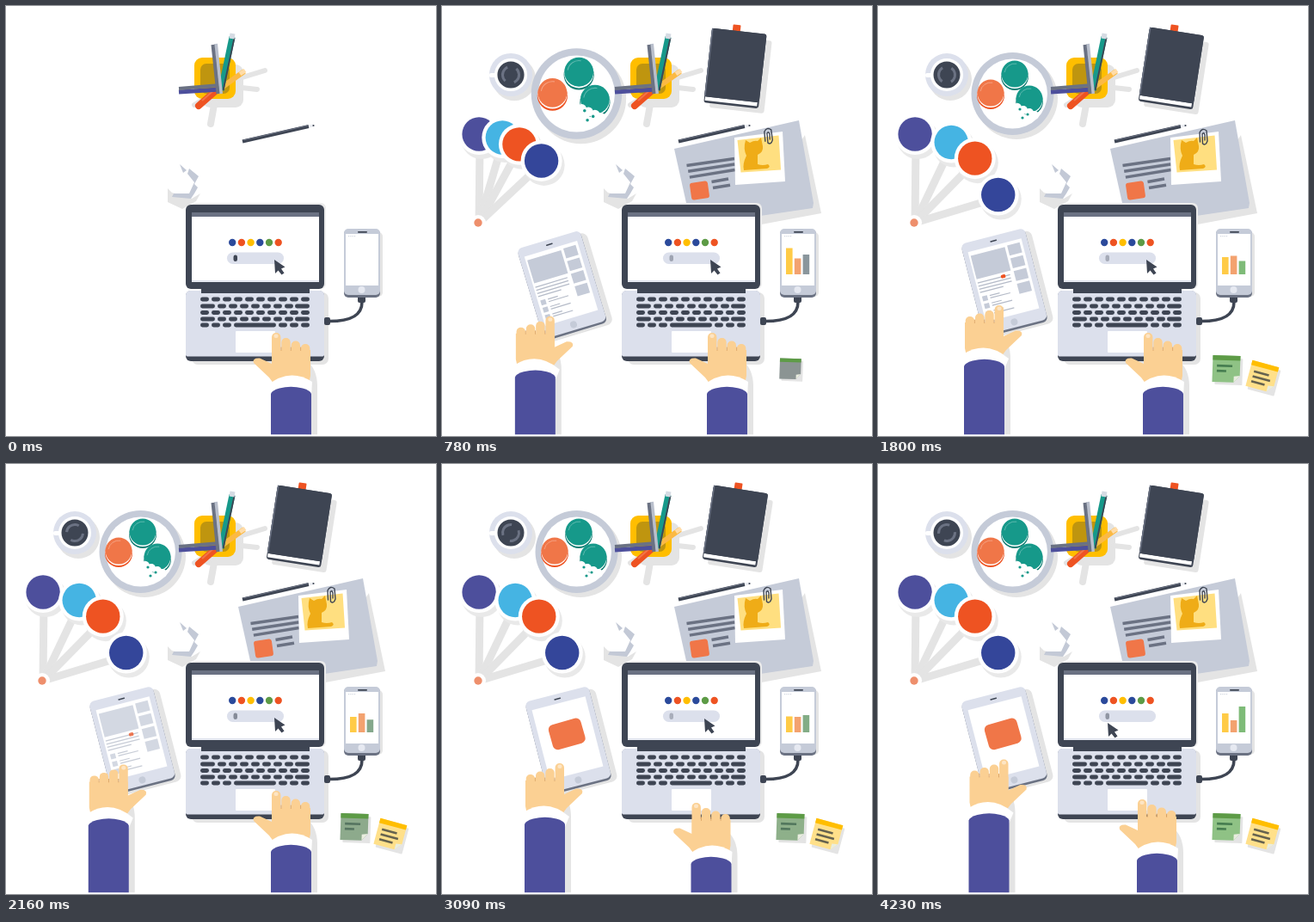
Recreate the animation shown at these times as an HTML page with a canvas. Size 500 by 500 pixels, loop 4.26 s.

```html
<!DOCTYPE html>
<html lang="en">
<head>
<meta charset="utf-8">
<title>Busy desk</title>
<style>
html, body { margin: 0; width: 100%; height: 100%; overflow: hidden; background: #fff; }
canvas { display: block; width: 100vw; height: 100vh; }
</style>
</head>
<body>
<canvas id="stage"></canvas>
<script>
const LOOP = 4260, STEP = 30;
const DARK = '#3e4553', SLATE = '#6b7283', MID = '#c5cbd8', PALE = '#dce0ec', SHADE = '#e4e4e4';
const WHITE = '#fff', YELLOW = '#ffbe00', RED = '#ee5322', CORAL = '#f07648', TEAL = '#16998a';
const PURPLE = '#4d4f9c', NAVY = '#34469a', SKY = '#45b4e3', GREEN = '#5d9b46', SKIN = '#fbd093';

const canvas = document.getElementById('stage');
const c = canvas.getContext('2d');

// Easing and keyframes
const clamp = v => Math.max(0, Math.min(1, v));
const mix = (a, b, p) => a + (b - a) * p;
const span = (t, start, length) => clamp((t - start) / length);
const outBack = p => p <= 0 ? 0 : 1 + 2.7 * (p - 1) ** 3 + 1.7 * (p - 1) ** 2;
const outCubic = p => 1 - (1 - p) ** 3;
const smooth = p => p * p * (3 - 2 * p);

// Keys are rows of [time, value, value, ...]
function track(t, keys) {
  let i = 0;
  while (i < keys.length - 2 && t > keys[i + 1][0]) i++;
  const a = keys[i], b = keys[i + 1];
  const p = smooth(span(t, a[0], b[0] - a[0]));
  return a.slice(1).map((v, k) => mix(v, b[k + 1], p));
}

// Drawing helpers
function fill(color) { c.fillStyle = color; c.fill(); }
function rect(x, y, w, h, color, r = 0) {
  c.beginPath();
  c.roundRect(x, y, w, h, r);
  fill(color);
}
function disc(x, y, r, color) {
  c.beginPath();
  c.arc(x, y, r, 0, 7);
  fill(color);
}
function poly(color, ...p) {
  c.beginPath();
  for (let i = 0; i < p.length; i += 2) c.lineTo(p[i], p[i + 1]);
  c.closePath();
  fill(color);
}
function line(x1, y1, x2, y2, w, color, cap = 'butt') {
  c.beginPath();
  c.moveTo(x1, y1);
  c.lineTo(x2, y2);
  c.lineWidth = w;
  c.lineCap = cap;
  c.strokeStyle = color;
  c.stroke();
}
function shape(d, color) { c.fillStyle = color; c.fill(new Path2D(d)); }
function trace(d, w, color) {
  c.lineWidth = w;
  c.lineCap = 'round';
  c.strokeStyle = color;
  c.stroke(new Path2D(d));
}
function at(x, y, deg, scale, draw) {
  if (scale <= 0) return;
  c.save();
  c.translate(x, y);
  c.rotate(deg * Math.PI / 180);
  c.scale(scale, scale);
  draw();
  c.restore();
}
function pop(x, y, scale, draw) {
  at(x, y, 0, scale, () => { c.translate(-x, -y); draw(); });
}

// Green items drift between grey and green
function greenTint(t, grey, green) {
  const [p] = track(t, [[0, 0], [780, .1], [1290, 0], [1800, 1], [2550, 0], [3090, .65], [4230, 1]]);
  return `rgb(${grey.map((v, i) => Math.round(mix(v, green[i], p)))})`;
}

function cup() {
  rect(228, 68, 48, 50, SHADE, 9);
  line(265, 86, 301, 75, 6, SHADE, 'round');
  line(274, 95, 292, 97, 6, SHADE, 'round');
  line(242, 115, 238, 137, 8, SHADE, 'round');
  line(234, 106, 219, 115, 6, SHADE, 'round');
  rect(219, 60, 48, 48, YELLOW, 9);
  rect(226, 67, 34, 35, '#bf950f', 7);
  line(249, 96, 277, 76, 6, '#fbb944');
  line(272, 79, 278, 75, 5, '#ffdca8');
  line(248, 95, 224, 116, 8, RED, 'round');
  line(246, 94, 228, 110, 2, CORAL);
  line(249, 97, 201, 100, 5, PURPLE);
  line(249, 92, 201, 96, 4, SLATE);
  line(250, 98, 263, 36, 7, TEAL);
  line(252.5, 98, 265.5, 37, 1.8, DARK);
  line(262.5, 38, 263.5, 32, 6, '#d5dbe3');
  line(250, 102, 244, 44, 4, '#b9bfcc');
  line(246.5, 102, 240.5, 45, 4, SLATE);
}

function pencil() {
  line(275, 157.5, 352, 140, 4, DARK);
  line(276, 156, 351, 139, 1, SLATE);
  line(352, 140, 357, 139, 3, '#eceef3');
  disc(357.5, 139, 1.1, DARK);
}

function crumple() {
  poly(SHADE, 188, 212, 193, 217, 216, 224, 226, 218, 221, 227, 205, 236, 188, 228);
  poly('#c3c9d6', 213, 189, 224, 198, 219, 207, 223, 211, 219, 218, 215, 224,
    193, 222, 195, 218, 213, 218, 219, 205, 211, 195);
  poly('#c3c9d6', 202, 184, 210, 191, 206, 194);
}

function cursor(x, y) {
  poly(DARK, x, y, x + 1, y + 16, x + 4.5, y + 12.5, x + 8.5, y + 17.5, x + 11.5, y + 15.5, x + 8, y + 10.5, x + 12.5, y + 8.5);
}

function laptop(t) {
  rect(215, 229, 157, 100, '#ebebeb', 6);
  rect(216, 333, 159, 84, SHADE, 7);
  rect(209, 231, 161, 98, DARK, 6);
  rect(216, 240, 148, 81, WHITE);
  rect(216, 240, 148, 5, SLATE);
  rect(216, 319, 148, 1.5, PALE);
  rect(209, 331, 161, 82, DARK, 6);
  rect(209, 331, 161, 76.5, PALE, [5, 5, 2, 2]);
  rect(227, 328, 126, 6, DARK);

  const key = (x, y, w = 10) => rect(x, y - 2.5, w, 5, DARK, 2.4);
  [341, 349, 356.5, 364, 371].forEach((y, row) => {
    const wide = row % 2;
    if (wide) { key(226, y, 17); key(336, y, 17); }
    for (let i = 0; i < (wide ? 7 : 10); i++) {
      if (row === 4 && i > 2 && i < 7) continue;
      key((wide ? 246 : 226) + i * 13, y);
    }
  });
  key(265, 371, 49);
  rect(267, 378, 46, 25, WHITE, 1);

  ['#2b4a9b', RED, YELLOW, '#2b4a9b', GREEN, RED].forEach((color, i) => disc(263.2 + i * 10.7, 275, 4.2, color));
  rect(257, 286.5, 66, 13.5, PALE, 6.7);
  c.globalAlpha = .65 + .35 * Math.cos(t * 2 * Math.PI / 1270);
  rect(264.5, 289.5, 4.5, 7.5, DARK, 2.2);
  c.globalAlpha = 1;
  cursor(...track(t, [[0, 312, 295], [2750, 312, 295], [3090, 305, 296], [3700, 267, 301], [LOOP, 267, 301]]));
}

function phone(t) {
  trace('M414 344C414 360 401 366.500 376 366.500', 3.6, DARK);
  rect(370, 362, 7, 9, DARK, 2);
  rect(409, 336, 9, 9, DARK, 2);
  rect(398, 263, 40, 75, SHADE, 5);
  rect(393, 260, 42, 79, SLATE, 5);
  rect(393, 259, 42, 77, MID, 5);
  rect(395, 265, 38, 60, WHITE);
  rect(409, 262, 11, 1.7, DARK, 1);
  disc(413.5, 330, 4, '#e6e9f1');
  for (let i = 0; i < 4; i++) rect(398 + i * 2.3, 267.3, 1.2, 1, MID);
  const bars = track(t, [[0, 0, 0, 0], [330, 0, 0, 0], [780, 30.5, 18.5, 23], [1290, 26.5, 19, 20], [1800, 20, 21.5, 15.500],
    [2550, 16, 22.5, 14], [3090, 18.5, 18, 20], [4230, 22, 14, 30]]);
  const tints = ['#ffcb47', '#f3a26f', greenTint(t, [139, 146, 160], [126, 187, 120])];
  bars.forEach((h, i) => rect(400 + i * 9.8, 312 - h, 7.6, h, tints[i]));
}

function paper(t) {
  pop(350, 195, outBack(span(t, 60, 600)), () => {
    poly(SHADE, 422, 150, 441, 241, 366, 255, 366, 236);
    poly(MID, 270, 166, 415, 133, 432, 229, 431, 235, 370, 244, 286, 238);
    for (let i = 0; i < 3; i++)
      line(284.5 + i * 1.7, 185.5 + i * 6.8, 340 + i * .4, 177.5 + i * 6.5, 3.4, SLATE);
    at(299.5, 214.5, -8, 1, () => rect(-10.5, -10, 21, 20, CORAL, 3));
    line(313.5, 204.5, 333, 201, 3.4, SLATE);
    line(315, 211.5, 335, 208.3, 3.4, SLATE);
  });
  pop(369, 178, outBack(span(t, 330, 400)), () => {
    poly(WHITE, 340, 153, 396, 146, 399, 204, 341, 208);
    poly('#ffdf80', 343.5, 156, 391.5, 150.5, 394, 190.5, 347.5, 193.5);
    shape('M353 156L358 159Q363 156 367 157L371 153L373 163Q374 170 367 173L367 184Q373 186 379 184Q383 187 378 189L351 191Q349 184 354 174Q350 166 353 156Z', '#efac17');
  });
  const clip = outCubic(span(t, 570, 380));
  if (clip > 0) at(378 + (1 - clip) * 12, 152 - (1 - clip) * 10, (1 - clip) * -30, 1, () =>
    trace('M-3.500 6L-4-5Q-1-11 4-7L5 5Q3 11-.500 8L-1-3Q1-6 2-2L2 4', 1.4, DARK));
}

function book(t) {
  const [deg] = track(t, [[0, -16], [120, -16], [780, 6.4], [1150, 9.2], [1500, 8.8], [LOOP, 8.8]]);
  at(341, 72, deg, outBack(span(t, 100, 600)), () => {
    rect(-25, -36, 64, 85, SHADE, 3);
    rect(-8, -50, 9, 8, RED, 1);
    rect(-32, -43, 64, 87, DARK, 3);
    rect(-31, 37, 61, 4.5, WHITE);
    rect(-32, -43, 64, 80, DARK, 3);
    rect(-32, -43, 1.5, 79, SLATE);
  });
}

function coffee(t) {
  at(80, 80, 0, outBack(span(t, 540, 640)), () => {
    disc(4, 5, 25, SHADE);
    disc(0, 0, 25, PALE);
    disc(0, 0, 19, WHITE);
    rect(-25, -2, 9, 5, WHITE, 2);
    disc(0, 0, 15.5, DARK);
    c.lineWidth = 3;
    c.lineCap = 'butt';
    c.strokeStyle = SLATE;
    for (let i = 0; i < 2; i++) {
      const a = t * 2 * Math.PI / 2130 + i * Math.PI;
      c.beginPath();
      c.arc(0, 0, 9.5, a, a + 2);
      c.stroke();
    }
  });
}

function macaron(x, y, color, edge) {
  disc(x, y + 1, 16, edge);
  disc(x, y - .5, 15.5, WHITE);
  disc(x, y - 2, 15.4, color);
  c.beginPath();
  c.arc(x, y - 2, 12, 3.3, 4.9);
  c.lineWidth = 1;
  c.strokeStyle = 'rgba(255,255,255,.3)';
  c.stroke();
}

function plate(t) {
  pop(157, 102, outBack(span(t, 240, 900)), () => {
    disc(161, 107, 48, SHADE);
    disc(156.5, 102, 48, MID);
    disc(156.5, 102, 40.5, WHITE);
    macaron(159, 81, TEAL, '#107d72');
    macaron(131, 103, CORAL, RED);
    macaron(176, 110, TEAL, '#107d72');
    for (const [x, y] of [[162, 118], [169, 121], [176, 124], [182, 127], [160, 124]]) disc(x, y, 5, WHITE);
    for (const [x, y] of [[165, 120], [174, 126], [168, 130]]) disc(x, y, 1.6, TEAL);
  });
}

function badges(t) {
  const grow = outCubic(span(t, 580, 150));
  if (!grow) return;
  const fan = outBack(span(t, 630, 870));
  const all = [[.6, PURPLE], [24.8, SKY], [43.4, RED], [71.6, NAVY]].map(([deg, color]) => {
    const a = mix(.6, deg, fan) * Math.PI / 180;
    return { x: 42 + Math.sin(a) * 103 * grow, y: 252 - Math.cos(a) * 103 * grow, color };
  });
  for (const b of all) {
    line(43, 252, b.x + 1, b.y + 3, 9, SHADE);
    disc(b.x + 3, b.y + 5, 24 * grow, '#e9e9e9');
  }
  for (const b of all) {
    disc(b.x, b.y, 24 * grow, WHITE);
    disc(b.x, b.y, 19.7 * grow, b.color);
  }
  disc(42, 252, 9, WHITE);
  disc(42, 252, 4.7, '#ee8f6c');
}

function sticky(x, y, deg, scale, body, top, ink, rows) {
  at(x, y, deg, scale, () => {
    rect(-13, -12, 32, 31, SHADE, 1);
    poly(body, -16, -15, 16, -15, 16, 8, 9, 16, -16, 16);
    poly('#e9eddf', 16, 8, 9, 16, 9, 9);
    rect(-16, -15, 32, 5.500, top);
    rows.forEach(([w, p], i) => { if (p > 0) line(-11, -3 + i * 6, -11 + w * p, -3 + i * 6, 2.6, ink); });
  });
}

function notes(t) {
  sticky(405, 421.5, 2, outBack(span(t, 620, 700)), greenTint(t, [139, 143, 148], [143, 194, 133]), GREEN,
    greenTint(t, [104, 108, 116], [70, 125, 80]), [[18, span(t, 1000, 200)], [11, span(t, 1150, 150)]]);
  sticky(447, 430.500, 15, outCubic(span(t, 980, 270)), '#ffe08a', YELLOW, '#66634f',
    [[18, span(t, 1130, 230)], [21, span(t, 1210, 200)], [16, span(t, 1270, 230)]]);
}

function page(t) {
  rect(8, 16, 41, 28, MID);
  for (let i = 0; i < 4; i++) {
    rect(52, 15 + i * 15.3, 15, 12, MID);
    rect(8, 48 + i * 3.8, i === 3 ? 28 : 39, 1.3, '#b5bbc8');
  }
  for (let i = 0; i < 3; i++) {
    const y = 65 + i * 9;
    rect(9, y, 6, 6, MID);
    rect(18, y + .5, 12, 1.2, '#b5bbc8');
    rect(18, y + 3.5, 24, 1.2, '#b5bbc8');
  }
  if (t > 1500) rect(36, 46.5, 5.500, 4, RED, 1.5);
}

function tablet(t, dx, dy, rest) {
  at(96 + dx, 277 + dy, -14.4 - rest * 11, 1, () => {
    rect(5, 4, 78, 111, SHADE, 7);
    rect(0, 1, 76.5, 111, SLATE, 6);
    rect(0, 0, 76.5, 109.5, PALE, 6);
    rect(6, 11, 64, 84, WHITE);
    rect(34, 5, 8, 1.5, DARK, 1);
    disc(38, 103, 4, MID);
    const swap = span(t, 2130, 120);
    if (swap < 1) {
      c.globalAlpha = 1 - swap;
      page(t);
      c.globalAlpha = 1;
    }
    at(38.5, 48, -1.5, outBack(span(t, 2190, 270)), () => rect(-19.5, -15, 39, 30, CORAL, 6));
  });
}

// Origin is the tip of the index finger
function hand(x, y, flip) {
  c.save();
  c.translate(x, y);
  const edge = flip < 0 ? 6 : 41;
  shape(`M${edge - 6} 32Q${edge + 7} 42 ${edge + 7} 62L${edge + 7} 200L${edge - 6} 200Z`, SHADE);
  c.scale(flip, 1);
  [0, 6, 9.5, 13].forEach((top, i) => rect(-5 + i * 11.3, top, 10.4, 40 - top, SKIN, 5));
  shape('M-5 20L-5 36L-19 29.500Q-28 29-26 35L-8 52Q-4 58 2 64L37 64L40 50L40 20Z', SKIN);
  for (let i = 0; i < 3; i++) line(6 + i * 11.3, 17, 6 + i * 11.3, 20.500, 1, '#dfa96a', 'round');
  rect(-2.5, 1.5, 5, 4.5, '#fde5c4', 2);
  shape('M-11 62Q15 40 42 57L41 74L-6 74Z', WHITE);
  shape('M-6 71Q-5 67 4 64.500Q17 61 31 64.500Q40 67 41 71L41 260L-6 260Z', PURPLE);
  c.restore();
}

function draw(t) {
  c.fillStyle = WHITE;
  c.fillRect(0, 0, 500, 500);
  c.save();
  c.beginPath();
  c.rect(0, 0, 500, 498.3);
  c.clip();

  coffee(t);
  plate(t);
  cup();
  book(t);
  paper(t);
  pencil();
  crumple();
  badges(t);
  laptop(t);
  phone(t);
  notes(t);

  const left = 1 - span(t, 300, 900);
  const dx = -42 * left ** 2, dy = 260 * left ** 5;
  const lag = 1 - smooth(span(t, 780, 500));
  tablet(t, dx, dy, left ** 2);
  const [lx, ly] = track(t, [[0, 150, 343], [1290, 150, 343], [1800, 141, 348], [2550, 132, 351], [3090, 137, 348], [4230, 146.500, 343.500]]);
  hand(lx + dx - 15 * lag, ly + dy + 12 * lag, -1);
  const [rx, ry] = track(t, [[0, 314, 380], [2250, 314, 380], [2550, 308, 384], [3090, 295.5, 394], [3500, 293, 396], [4230, 307, 390]]);
  hand(rx, ry, 1);
  c.restore();
}

function resize() {
  const ratio = window.devicePixelRatio || 1;
  canvas.width = Math.round(innerWidth * ratio);
  canvas.height = Math.round(innerHeight * ratio);
  c.setTransform(canvas.width / 500, 0, 0, canvas.height / 500, 0, 0);
}

const start = performance.now();
function tick() {
  const t = (performance.now() - start) % LOOP;
  draw(t < 60 ? 0 : Math.floor(t / STEP) * STEP);
  requestAnimationFrame(tick);
}
addEventListener('resize', resize);
resize();
tick();
</script>
</body>
</html>
```
